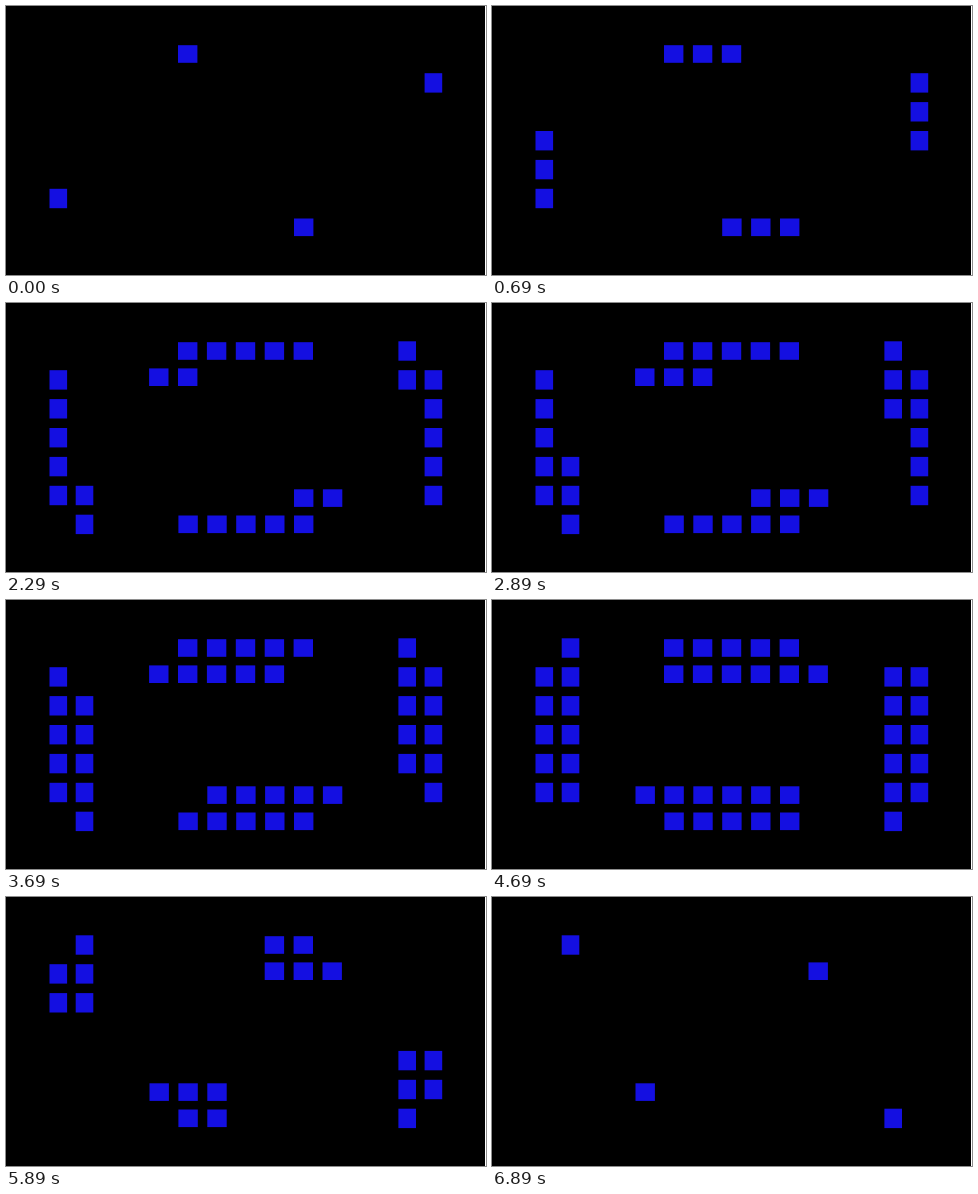
Animation of 480 by 269 pixels, one loop 7290 ms. Source, as an HTML page:

```html
<!DOCTYPE html>
<html lang="en">
<head>
<meta charset="utf-8">
<title>Clockwise squares</title>
<style>
  html, body { margin: 0; width: 100%; height: 100%; overflow: hidden; background: #000; }
  svg { display: block; width: 100%; height: 100%; }
</style>
</head>
<body>
<svg id="stage" viewBox="0 0 480 269" preserveAspectRatio="none">
  <rect width="480" height="269" fill="#000"/>
  <rect x="479" width="1" height="269" fill="#fff"/>
  <g id="squares" fill="#140fe1"></g>
</svg>
<script>
const LOOP = 7290, STEP = 400;
const PITCH = 28.9, ROW_GAP = 26.2;
const LONG = 19.4, SHORT = 17.6;

// Centre of the first inner square and the direction of travel.
const sides = [
  { x: 152.8, y: 74.2, dx: 1, dy: 0 },
  { x: 401.2, y: 48, dx: 0, dy: 1 },
  { x: 326.6, y: 195.1, dx: -1, dy: 0 },
  { x: 78.5, y: 221.4, dx: 0, dy: -1 }
];

const group = document.getElementById('squares');
const squares = [];

const outerOn = i => Math.max(0, 290 + STEP * (i - 2));
const innerOn = i => 1890 + STEP * i;
// Removal pauses briefly after the fourth column.
const columnOff = i => 4690 + STEP * i + (i > 3 ? 200 : 0);

function addSquare(side, i, row, on) {
  const { x, y, dx, dy } = side;
  const w = dx ? LONG : SHORT, h = dx ? SHORT : LONG;
  const cx = x + dx * PITCH * i + dy * ROW_GAP * row;
  const cy = y + dy * PITCH * i - dx * ROW_GAP * row;
  const el = document.createElementNS('http://www.w3.org/2000/svg', 'rect');
  const attrs = { x: cx - w / 2, y: cy - h / 2, width: w, height: h };
  for (const key in attrs) el.setAttribute(key, attrs[key].toFixed(2));
  group.appendChild(el);
  squares.push({ el, on, off: columnOff(i) });
}

for (const side of sides) {
  for (let i = 0; i < 7; i++) {
    addSquare(side, i, 0, innerOn(i));
    if (i > 0 && i < 6) addSquare(side, i, 1, outerOn(i));
  }
}

function draw(t) {
  for (const { el, on, off } of squares) {
    el.setAttribute('visibility', t >= on && t < off ? 'visible' : 'hidden');
  }
}

const start = performance.now();
function tick() {
  draw((performance.now() - start) % LOOP);
  requestAnimationFrame(tick);
}
draw(0);
requestAnimationFrame(tick);
</script>
</body>
</html>
```
